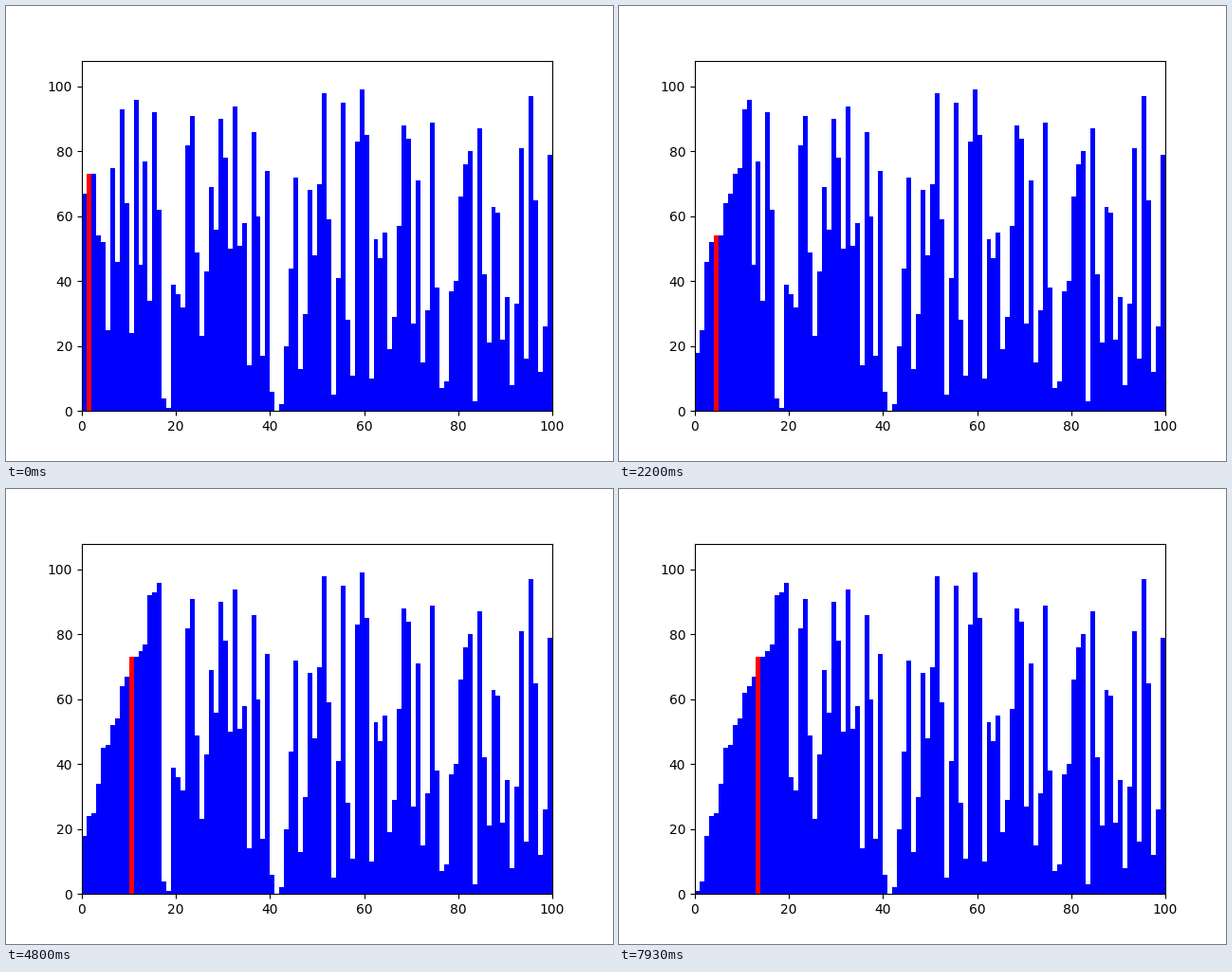
A matplotlib script for the animation above (8 s loop, 640 by 480 pixels).

```python
import itertools

import matplotlib.pyplot as plt
from matplotlib.animation import FuncAnimation

FRAMES = 120
LOOP_MS = 8000

VALUES = [
    67, 73, 18, 54, 52, 25, 75, 46, 93, 64, 24, 96, 45, 77, 34, 92, 62, 4, 1, 39,
    36, 32, 82, 91, 49, 23, 43, 69, 56, 90, 78, 50, 94, 51, 58, 14, 86, 60, 17, 74,
    6, 0, 2, 20, 44, 72, 13, 30, 68, 48, 70, 98, 59, 5, 41, 95, 28, 11, 83, 99,
    85, 10, 53, 47, 55, 19, 29, 57, 88, 84, 27, 71, 15, 31, 89, 38, 7, 9, 37, 40,
    66, 76, 80, 3, 87, 42, 21, 63, 61, 22, 35, 8, 33, 81, 16, 97, 65, 12, 26, 79,
]


def insertion_sort(values, start):
    """Yield (array, active index) after every shift and every insertion."""
    a = list(values)
    for i in range(start, len(a)):
        key, hole = a[i], i
        while hole > 0 and a[hole - 1] > key:
            a[hole] = a[hole - 1]
            hole -= 1
            yield a[:], hole
        a[hole] = key
        yield a[:], hole


# The first two values are already in order.
steps = list(itertools.islice(insertion_sort(VALUES, 2), FRAMES))

fig, ax = plt.subplots(figsize=(6.4, 4.8), dpi=100)
ax.set_xlim(0, len(VALUES))
ax.set_ylim(0, int(1.1 * max(VALUES)))
bars = ax.bar(range(len(VALUES)), VALUES, width=1, align="edge", color="blue")


def draw(frame):
    heights, active = steps[frame]
    for k, (bar, height) in enumerate(zip(bars, heights)):
        bar.set_height(height)
        bar.set_facecolor("red" if k == active else "blue")
    return list(bars)


anim = FuncAnimation(fig, draw, frames=FRAMES, interval=LOOP_MS / FRAMES,
                     repeat=True, repeat_delay=0, blit=False)
plt.show()
```
